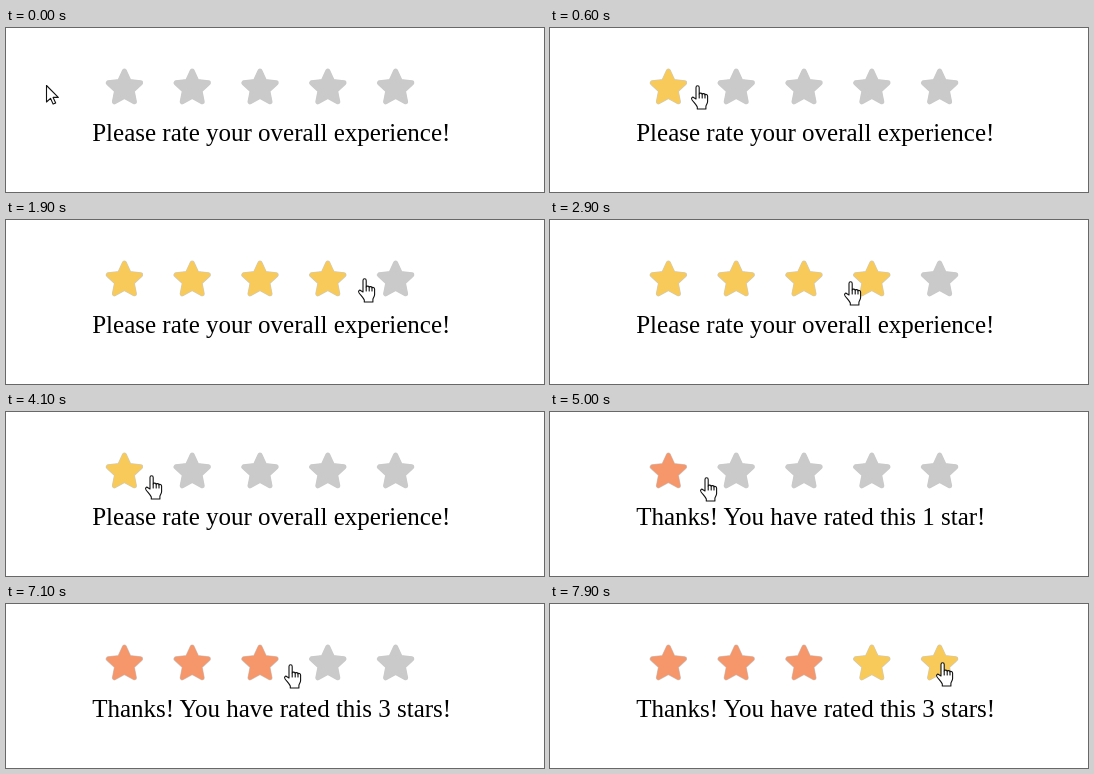
Recreate the animation shown at these times as an HTML page. Size 538 by 164 pixels, loop 8000 ms.

```html
<!DOCTYPE html>
<html lang="en">
<head>
<meta charset="utf-8">
<title>Star rating</title>
<style>
  html, body { margin: 0; width: 100%; height: 100%; overflow: hidden; background: #fff; }
  svg { display: block; }
  text { font: 25px "Liberation Serif", "Times New Roman", serif; }
  .star { stroke-linejoin: round; }
  .cursor { fill: #fff; stroke: #111; stroke-width: 1.1; stroke-linejoin: round; stroke-linecap: round; }
</style>
</head>
<body>
<svg width="538" height="164" viewBox="0 0 538 164">
  <g id="stars"></g>
  <text id="message" x="86.2" y="113"></text>
  <path id="arrow" class="cursor" d="M.5 .5V17l4-3.7 2.6 5.8 2.6-1.1-2.6-5.6h5.2z"/>
  <g id="hand" class="cursor">
    <path d="M5 14V2.4a1.6 1.6 0 0 1 3.2 0V9c.2-1.3 3-1.2 3 .3c.3-1 2.8-.9 2.8 .6c.4-.9 2.6-.6 2.6 1.2V16.5c0 2.2-1.7 3.5-1.7 5V24H6.3V22C5.5 20 2.5 17 1.1 15C-.3 12.8 1.5 11.5 3 12.7Z"/>
    <path fill="none" d="M8.2 9v4M11.2 9.3v3.7M14 9.9v3.1"/>
  </g>
</svg>
<script>
const LOOP = 8000, STEP = 100;
const GREY = '#cacaca', YELLOW = '#f8ca5a', ORANGE = '#f6966b';
const SPACING = 67.8, FIRST_X = 118.4, STAR_Y = 60.1, FIRST_EDGE = 90;

// Key points of the pointer: time, x, y
const route = [
  [0, 40, 57], [1100, 237, 57], [1900, 358, 58], [2400, 400, 66],
  [2900, 300, 61], [3500, 103, 66], [3900, 103, 66], [4100, 145, 63],
  [4900, 126, 65], [5500, 306, 66], [5800, 261, 62], [6900, 257, 60],
  [LOOP, 405, 58]
];
const clicks = [[4500, 1], [6600, 3]];

const byId = id => document.getElementById(id);
const message = byId('message'), arrow = byId('arrow'), hand = byId('hand');

function starPoints(cx, cy) {
  return Array.from({ length: 10 }, (_, i) => {
    const r = i % 2 ? 8.2 : 17, a = i * Math.PI / 5;
    return `${(cx + r * Math.sin(a)).toFixed(2)},${(cy - r * Math.cos(a)).toFixed(2)}`;
  }).join(' ');
}

function addStar(index, strokeWidth) {
  const star = document.createElementNS('http://www.w3.org/2000/svg', 'polygon');
  star.setAttribute('class', 'star');
  star.setAttribute('stroke-width', strokeWidth);
  star.setAttribute('points', starPoints(FIRST_X + index * SPACING, STAR_Y));
  return byId('stars').appendChild(star);
}

function paint(star, color) {
  star.setAttribute('fill', color);
  star.setAttribute('stroke', color);
}

// A grey star shows as a thin rim around the coloured one
const stars = Array.from({ length: 5 }, (_, i) => {
  paint(addStar(i, 5), GREY);
  return addStar(i, 4);
});

function pointerAt(t) {
  const next = route.findIndex(p => p[0] > t);
  const [t0, x0, y0] = route[next - 1], [t1, x1, y1] = route[next];
  const k = (t - t0) / (t1 - t0);
  return [Math.round(x0 + (x1 - x0) * k), Math.round(y0 + (y1 - y0) * k)];
}

function place(cursor, visible, x, y) {
  cursor.setAttribute('visibility', visible ? 'visible' : 'hidden');
  cursor.setAttribute('transform', `translate(${x} ${y})`);
}

function render(t) {
  const [x, y] = pointerAt(t);
  const hovered = Math.max(0, Math.floor((x - FIRST_EDGE) / SPACING) + 1);
  const rated = clicks.reduce((value, [time, n]) => t >= time ? n : value, 0);

  stars.forEach((star, i) =>
    paint(star, i < rated ? ORANGE : i < hovered ? YELLOW : GREY));
  message.textContent = rated
    ? `Thanks! You have rated this ${rated} star${rated > 1 ? 's' : ''}!`
    : 'Please rate your overall experience!';
  place(arrow, !hovered, x, y);
  place(hand, hovered, x - 6, y);
}

function tick() {
  const t = performance.now() % LOOP;
  render(Math.floor(t / STEP) * STEP);
  requestAnimationFrame(tick);
}
tick();
</script>
</body>
</html>
```
